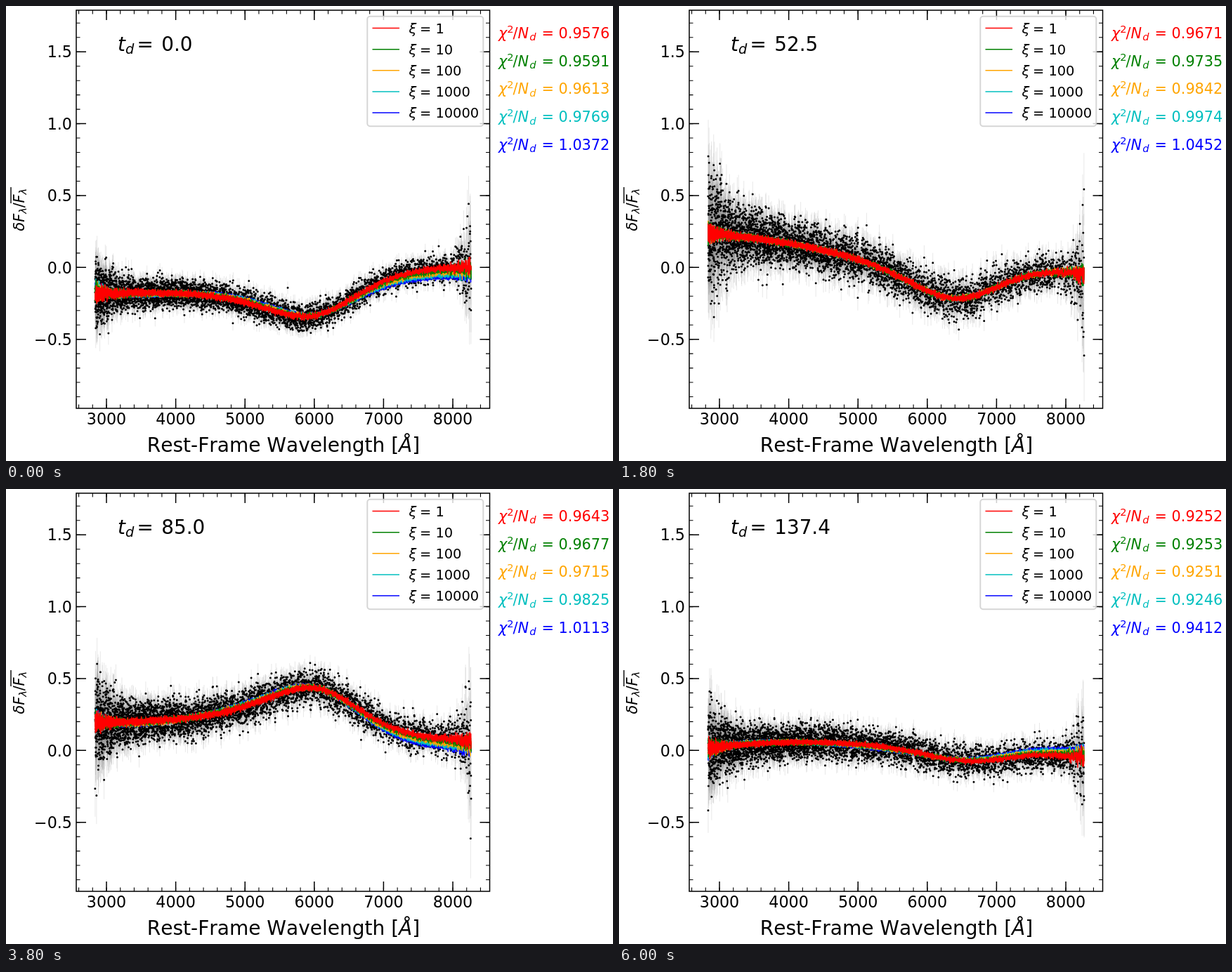
These frames come from a looping animation (864x648 px, 6.2 s). An HTML page with a canvas:

```html
<!DOCTYPE html>
<html lang="en">
<head>
<meta charset="utf-8">
<title>Spectrum fits over time delay</title>
<style>
html, body { margin: 0; width: 100%; height: 100%; overflow: hidden; background: #fff; }
canvas, svg { position: absolute; left: 0; top: 0; width: 864px; height: 648px; }
text { font-family: "DejaVu Sans", sans-serif; font-kerning: none; white-space: pre; }
.it { font-style: italic; }
</style>
</head>
<body>
<canvas id="plot" width="864" height="648"></canvas>
<svg id="frame" viewBox="0 0 864 648"></svg>
<script>
const STEP = 200, STEPS = 31;
const LEFT = 100, RIGHT = 688.5, TOP = 6, BOTTOM = 573;
const FIRST = 127, LAST = 662;
const xOf = w => 143 + (w - 3000) * 0.0986;
const yOf = v => 372.3 - v * 204.7;

// Key poses. from/to: ends of the continuum, bow: its sag, peak/bell: the line feature,
// noise: scatter, drift: how far the stiffest fit strays
const poses = [
  { at: 0, delay: 0, from: 404, to: 371, bow: -2, peak: 430, bell: 59, noise: 10, drift: 16,
    chi: [.9576, .9591, .9613, .9769, 1.0372] },
  { at: 6, delay: 42.1, from: 310, to: 393, bow: 6, peak: 455, bell: 88, noise: 20, drift: -16,
    chi: [.9888, .9924, 1.0006, 1.0098, 1.0763] },
  { at: 12, delay: 62.8, from: 326, to: 370, bow: -16, peak: 490, bell: 35, noise: 16, drift: 14,
    chi: [.9454, .9547, .9679, .985, 1.014] },
  { at: 16, delay: 72.3, from: 322, to: 343, bow: -10, peak: 430, bell: -164, noise: 17, drift: 19,
    chi: [.9462, .9524, .9593, .9775, 1.0199] },
  { at: 22, delay: 97.7, from: 357, to: 373, bow: 6, peak: 437, bell: 34, noise: 11, drift: 13,
    chi: [.9824, .983, .9837, .9875, 1.0027] },
  { at: 27, delay: 121.6, from: 443, to: 389, bow: -4, peak: 428, bell: 102, noise: 7, drift: 10,
    chi: [.6937, .6964, .7018, .707, .7278] },
  { at: 30, delay: 137.4, from: 366, to: 382, bow: -18, peak: 490, bell: 26, noise: 13, drift: -11,
    chi: [.9252, .9253, .9251, .9246, .9412] }
];

const series = ["#ff0000", "#008000", "#ffa500", "#00bfbf", "#0000ff"]
  .map((color, i) => ({ color, name: 10 ** i, share: i / 4 }));

// Wavelengths evenly spaced in the logarithm
const pointX = [];
for (let l = Math.log10(2836); l < Math.log10(8266); l += 1e-4) pointX.push(xOf(10 ** l));

/* ---- static frame and labels ---- */
const svg = document.getElementById("frame");

function add(tag, attrs, content) {
  const el = document.createElementNS("http://www.w3.org/2000/svg", tag);
  for (const key in attrs) el.setAttribute(key, attrs[key]);
  if (content !== undefined) el.textContent = content;
  svg.appendChild(el);
  return el;
}
const label = (x, y, size, str, more) => add("text", { x, y, "font-size": size, ...more }, str);
const italic = (x, y, size, str, more) => label(x, y, size, str, { class: "it", ...more });

function drawAxes() {
  let major = "", minor = "";
  const xTick = (x, len) => `M${x} ${TOP}v${len}M${x} ${BOTTOM}v${-len}`;
  const yTick = (y, len) => `M${LEFT} ${y}h${len}M${RIGHT} ${y}h${-len}`;
  for (let w = 2600; w <= 8400; w += 200) minor += xTick(xOf(w), 5.5);
  for (let i = -9; i <= 17; i++) minor += yTick(yOf(i / 10), 5.5);
  for (let w = 3000; w <= 8000; w += 1000) {
    major += xTick(xOf(w), 14);
    label(xOf(w), 596.3, 22.2, w, { "text-anchor": "middle" });
  }
  for (let v = -.5; v <= 1.5; v += .5) {
    major += yTick(yOf(v), 14);
    label(94, yOf(v) + 8.2, 22.2, v.toFixed(1).replace("-", "\u2212"), { "text-anchor": "end" });
  }
  add("path", { d: minor, stroke: "#000", "stroke-width": 1.1 });
  add("path", { d: major, stroke: "#000", "stroke-width": 1.5 });
  add("rect", { x: LEFT, y: TOP, width: RIGHT - LEFT, height: BOTTOM - TOP,
    fill: "none", stroke: "#000", "stroke-width": 1.5 });

  const title = label(395, 635.3, 28, "Rest-Frame Wavelength [", { "text-anchor": "middle" });
  const unit = add("tspan", { class: "it" }, "\u00c5");
  title.append(unit, "]");
}

function drawYLabel() {
  const turn = { transform: "translate(25.5 320.5) rotate(-90)" };
  italic(0, 0, 20.8, "δF", turn);
  italic(24.7, 3.4, 14.6, "λ", turn);
  label(33.3, 0, 20.8, "/", turn);
  italic(40, 0, 20.8, "F", turn);
  italic(52, 3.4, 14.6, "λ", turn);
  add("path", { d: "M39.5 -18.5H62.5", stroke: "#000", "stroke-width": 1.4, ...turn });
}

function drawLegend() {
  add("rect", { x: 514.3, y: 14.8, width: 165, height: 156.4, rx: 4,
    fill: "#fff", "fill-opacity": .8, stroke: "#ccc", "stroke-opacity": .8, "stroke-width": 2 });
  series.forEach((s, i) => {
    const y = 31.6 + 30.1 * i;
    add("path", { d: `M521.5 ${y}H560`, stroke: s.color, "stroke-width": 1.5 });
    italic(573.5, y + 7, 19.4, "ξ");
    label(589, y + 7, 19.4, "= " + s.name);
  });
}

function drawChi() {
  return series.map((s, i) => {
    const y = 45.8 + 39.8 * i, fill = { fill: s.color };
    italic(701, y, 20.8, "χ", fill);
    label(713.3, y - 8, 14.6, "2", fill);
    label(721.6, y, 20.8, "/", fill);
    italic(728.6, y, 20.8, "N", fill);
    italic(745.2, y + 3.4, 14.6, "d", fill);
    return label(762.5, y, 20.8, "", fill);
  });
}

drawAxes();
drawYLabel();
drawLegend();
const chiText = drawChi();
italic(159, 63.6, 27.8, "t");
italic(169.9, 68, 19.4, "d");
label(186.5, 63.6, 27.8, "=");
const delayText = label(221.3, 63.6, 27.8, "");

/* ---- data ---- */
const ctx = document.getElementById("plot").getContext("2d");
const mix = (a, b, t) => a + (b - a) * t;
const along = x => (x - FIRST) / (LAST - FIRST);
const nearFirst = (x, reach) => Math.exp((FIRST - x) / reach);
const nearLast = (x, reach) => Math.exp((x - LAST) / reach);

function random(seed) {
  return () => {
    seed = (seed + 0x6d2b79f5) | 0;
    let t = Math.imul(seed ^ (seed >>> 15), 1 | seed);
    t = (t + Math.imul(t ^ (t >>> 7), 61 | t)) ^ t;
    return ((t ^ (t >>> 14)) >>> 0) / 4294967296;
  };
}

// Bowed continuum plus a line with a long blue wing and a short red one
function curve(p, x) {
  const u = along(x), d = x - p.peak;
  const wing = d < 0 ? 1 / (1 + (d / 102) ** 2) : Math.exp(-((d / 92) ** 2));
  return mix(p.from, p.to, u) + p.bow * 4 * u * (1 - u) + p.bell * wing;
}

// Scatter grows towards both ends of the detector
function scatter(p, x) {
  return mix(p.noise, 5 + .4 * p.noise, along(x))
    + 1.7 * p.noise * nearFirst(x, 22) + 45 * nearLast(x, 9);
}

function stray(p, x) {
  const u = along(x);
  return p.drift * (.7 * u ** 4 - nearFirst(x, 25) - .35 * Math.sin(Math.PI * (u - .25) / .4));
}

function ripple(p, x) {
  return 3.2 + Math.abs(p.bell) / 45 + 10 * nearFirst(x, 18) + 13 * nearLast(x, 14);
}

function poseAt(step) {
  let k = 0;
  while (k < poses.length - 2 && step >= poses[k + 1].at) k++;
  const a = poses[k], b = poses[k + 1], t = (step - a.at) / (b.at - a.at);
  const pose = {};
  for (const key in a) {
    pose[key] = Array.isArray(a[key]) ? a[key].map((v, i) => mix(v, b[key][i], t)) : mix(a[key], b[key], t);
  }
  return pose;
}

function drawStep(step) {
  const pose = poseAt(step), rnd = random(7919 * (step + 1));
  const gauss = () => Math.sqrt(-2 * Math.log(1 - rnd())) * Math.cos(2 * Math.PI * rnd());
  const points = pointX.map(x => {
    const base = curve(pose, x), sigma = scatter(pose, x);
    return { x, base, sigma, y: base + sigma * gauss() };
  });

  ctx.clearRect(0, 0, 864, 648);
  ctx.save();
  ctx.beginPath();
  ctx.rect(LEFT, TOP, RIGHT - LEFT, BOTTOM - TOP);
  ctx.clip();

  ctx.strokeStyle = "rgba(128,128,128,.18)";
  ctx.lineWidth = 1;
  for (const { x, y, sigma } of points) {
    const reach = sigma * (.9 + .3 * rnd());
    ctx.beginPath();
    ctx.moveTo(x, y - reach);
    ctx.lineTo(x, y + reach);
    ctx.stroke();
  }

  ctx.fillStyle = "#000";
  ctx.beginPath();
  for (const { x, y } of points) {
    ctx.moveTo(x + 1.5, y);
    ctx.arc(x, y, 1.5, 0, 7);
  }
  ctx.fill();

  ctx.lineWidth = 1.5;
  ctx.lineJoin = "round";
  for (const { color, share } of [...series].reverse()) {
    ctx.strokeStyle = color;
    ctx.beginPath();
    for (const { x, base } of points) {
      const jitter = Math.max(-1.4, Math.min(1.4, gauss() * .5));
      ctx.lineTo(x, base + share * stray(pose, x) + ripple(pose, x) * (1 - .35 * share) * jitter);
    }
    ctx.stroke();
  }
  ctx.restore();

  delayText.textContent = pose.delay.toFixed(1);
  chiText.forEach((el, i) => { el.textContent = "= " + pose.chi[i].toFixed(4); });
}

const start = performance.now();
let shown = -1;
function tick() {
  const step = Math.floor((performance.now() - start) / STEP) % STEPS;
  if (step !== shown) drawStep(shown = step);
  requestAnimationFrame(tick);
}
tick();
</script>
</body>
</html>
```
